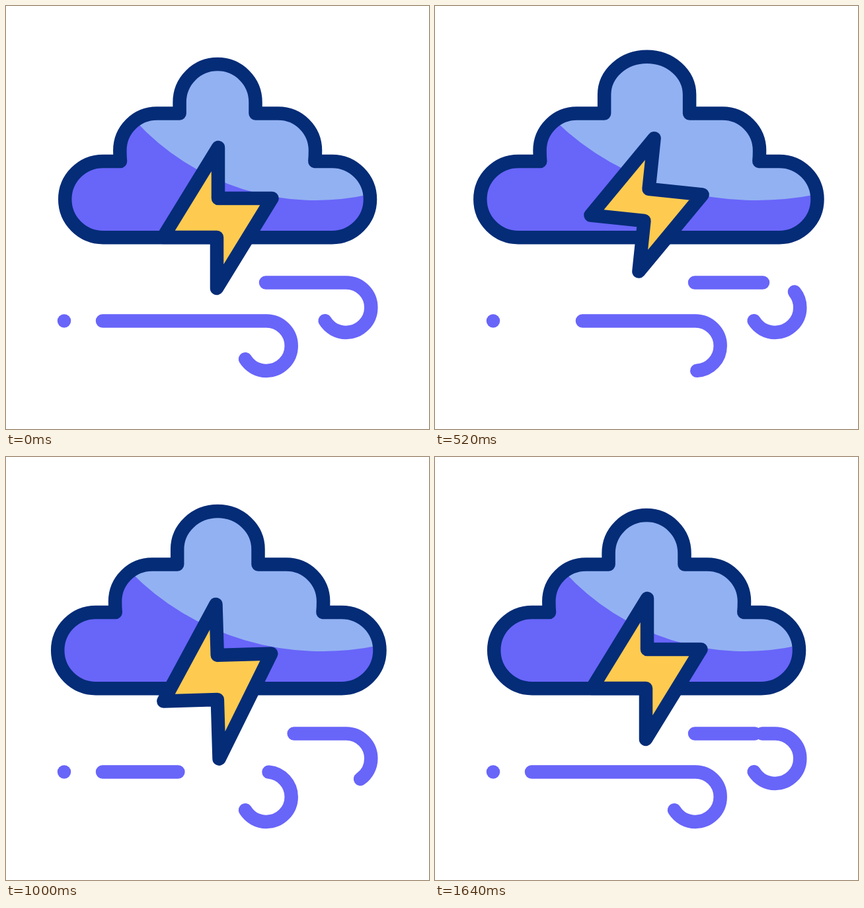
An HTML page with a canvas that plays this animation: 640 px wide and 640 px high, repeating every 1.68 s.

```html
<!DOCTYPE html>
<html lang="en">
<head>
<meta charset="utf-8">
<title>Storm cloud</title>
<style>
  html, body { margin: 0; width: 640px; height: 640px; overflow: hidden; background: #fff; }
  canvas { display: block; }
</style>
</head>
<body>
<canvas id="stage" width="640" height="640"></canvas>
<script>
const ctx = document.getElementById('stage').getContext('2d');
const LOOP = 1680, STEP = 40;
const NAVY = '#042c77', VIOLET = '#6865f9', SKY = '#92b1f2', GOLD = '#fecb50';

const clamp = (x, max = 1) => Math.min(max, Math.max(0, x));
const mix = (a, b, p) => a + (b - a) * p;

// cubic-bezier(.667, 0, .333, 1)
function ease(x) {
  let lo = 0, hi = 1;
  for (let i = 0; i < 24; i++) {
    const s = (lo + hi) / 2, r = 1 - s;
    if (2 * s * r * r + s * s * r + s ** 3 < x) lo = s; else hi = s;
  }
  return lo * lo * (3 - 2 * lo);
}

// The cloud swells and shrinks twice, 376 ms each way.
function swell(t) {
  const beat = clamp((t - 60) / 376, 4);
  return ease(1 - Math.abs(1 - beat % 2));
}

function drawCloud(t) {
  const p = swell(t);
  const left = 89.2 - 22 * p, right = 551 + 29 * p;
  const midL = -14.5 * p, midR = 24.3 * p;
  const topL = 262.6 - 6.8 * p, topR = 377.5 + 8 * p;
  const side = 145.5 - 12 * p, rx = (topR - topL) / 2;
  const cloud = new Path2D(`M${left + 57.7} 350.2
    A57.7 57.6 0 0 1 ${left + 57.7} 235 H${173 + midL}
    Q${172.3 + midL} 228 ${172.3 + midL} 218.5 A56 56 0 0 1 ${228.3 + midL} 162.5
    H${topL} V${side} A${rx} 57.4 0 0 1 ${topR} ${side} V162.5
    H${412 + midR} A56 56 0 0 1 ${468 + midR} 218.5 Q${468 + midR} 228 ${467.3 + midR} 235
    H${right - 57.7} A57.7 57.6 0 0 1 ${right - 57.7} 350.2 Z`);
  const x0 = 195 + midL, stretch = (right - x0) / 356;
  const light = new Path2D(`M${x0} 173 A${371 * stretch} 371 0 0 0 ${right} 284.8
    H640 V0 H${x0} Z`);

  ctx.fillStyle = VIOLET;
  ctx.fill(cloud);
  ctx.save();
  ctx.clip(cloud);
  ctx.fillStyle = SKY;
  ctx.fill(light);
  ctx.restore();
  ctx.strokeStyle = NAVY;
  ctx.stroke(cloud);
}

// Vertical shift of the bolt's upper half, waist and tip, and its turn in degrees.
const rest = { top: 0, waist: 0, tip: 0, turn: 0 };
const raised = { top: -14.4, waist: -24.8, tip: -24.8, turn: 6 };
const struck = { top: 10.2, waist: 19.5, tip: 34, turn: -2 };
const poses = [rest, raised, struck, rest, rest];

function drawBolt(t) {
  const beat = clamp((t - 160) / 362, 3), i = Math.floor(beat), p = ease(beat - i);
  const [top, waist, tip, turn] = Object.keys(rest).map(k => mix(poses[i][k], poses[i + 1][k], p));
  const shift = (top + tip) / 2;
  const upper = top - shift, middle = waist - shift, lower = tip - shift;
  ctx.save();
  ctx.translate(320, 320.5 + shift);
  ctx.rotate(turn * Math.PI / 180);
  ctx.beginPath();
  ctx.moveTo(1, upper - 106.5);
  ctx.lineTo(1, upper - 29.5);
  ctx.lineTo(82.5, upper - 29.5);
  ctx.lineTo(-1, lower + 106.5);
  ctx.lineTo(-1, middle + 29.5);
  ctx.lineTo(-82.5, middle + 29.5);
  ctx.closePath();
  ctx.fillStyle = GOLD;
  ctx.fill();
  ctx.stroke();
  ctx.restore();
}

// A gap runs along each wind line at constant speed, opening and closing once.
const winds = [
  { x: 146, y: 476.5, bend: 394, from: 196, speed: .323, open: 280, close: 1640, widest: 150, skew: .72 },
  { x: 393, y: 418.5, bend: 514.6, from: -20.5, speed: .2375, open: 310, close: 1690, widest: 104, skew: .95 }
];

function drawWind({ x, y, bend, from, speed, open, close, widest, skew }, t) {
  const r = 37.7, end = 148 * Math.PI / 180;
  const total = bend - x + r * (end + Math.PI / 2);
  const gap = widest * Math.sin(Math.PI * clamp((t - open) / (close - open)) ** skew);
  ctx.save();
  if (gap > .5) {
    ctx.setLineDash([total - gap, gap]);
    ctx.lineDashOffset = -(from + speed * t + gap);
  }
  ctx.beginPath();
  ctx.moveTo(x, y);
  ctx.arc(bend, y + r, r, -Math.PI / 2, end);
  ctx.stroke();
  ctx.restore();
}

function draw(t) {
  ctx.fillStyle = '#fff';
  ctx.fillRect(0, 0, 640, 640);
  ctx.lineWidth = 20.5;
  ctx.lineCap = ctx.lineJoin = 'round';
  drawCloud(t);
  drawBolt(t);
  ctx.strokeStyle = ctx.fillStyle = VIOLET;
  winds.forEach(wind => drawWind(wind, t));
  ctx.beginPath();
  ctx.arc(88, 476.5, 10.25, 0, 2 * Math.PI);
  ctx.fill();
}

function tick() {
  const t = Math.floor(performance.now() % LOOP / STEP) * STEP;
  draw(t < 2 * STEP ? 0 : t); // the opening pose is held for two steps
  requestAnimationFrame(tick);
}
tick();
</script>
</body>
</html>
```
